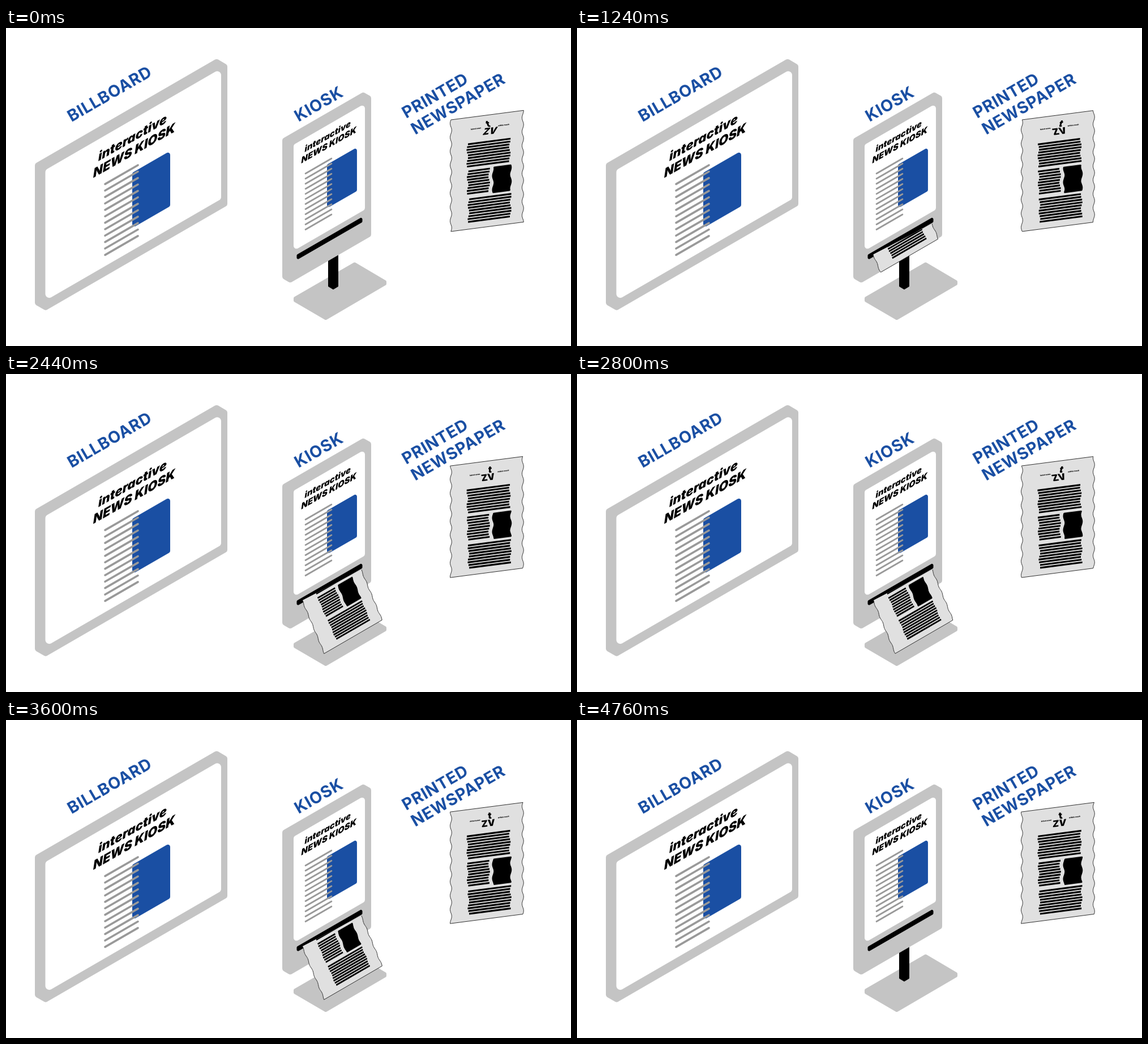
Animation, 998 px wide and 561 px high, one loop 4.8 s. Source, as an HTML page with a canvas:

```html
<!DOCTYPE html>
<html lang="en">
<head>
<meta charset="utf-8">
<title>Billboard, kiosk, printed newspaper</title>
<style>
  html, body { margin: 0; width: 100%; height: 100%; overflow: hidden; background: #fff; }
  canvas { display: block; width: 998px; height: 561px; }
</style>
</head>
<body>
<canvas id="stage" width="998" height="561"></canvas>
<script>
const ctx = document.getElementById('stage').getContext('2d');
const LOOP = 4800, STEP = 40, TAU = Math.PI * 2;
const ISO = Math.tan(Math.PI / 6);
const BLUE = '#1a4fa3', GREY = '#c4c4c4', LINE = '#999', PAPER = '#e0e0e0';
const SANS = 'Inter, Roboto, sans-serif';
const PAGE = { w: 127, h: 197 };
const WAVE = { length: 24.6, period: 192 };

// Closed polygon with rounded corners
function roundPoly(points, radius, fill) {
  const n = points.length, [last, first] = [points[n - 1], points[0]];
  ctx.beginPath();
  ctx.moveTo((last[0] + first[0]) / 2, (last[1] + first[1]) / 2);
  points.forEach((p, i) => {
    const q = points[(i + 1) % n];
    ctx.arcTo(p[0], p[1], q[0], q[1], radius);
  });
  ctx.closePath();
  ctx.fillStyle = fill;
  ctx.fill();
}

// Panel with vertical sides and isometric top and bottom
function isoPanel(x, y, w, h, radius, fill) {
  const rise = w * ISO;
  roundPoly([[x, y], [x + w, y - rise], [x + w, y + h - rise], [x, y + h]], radius, fill);
}

function frame(x, y, w, h, depth) {
  const rise = w * ISO, drop = depth * ISO;
  roundPoly([
    [x, y], [x + w, y - rise], [x + w + depth, y - rise + drop],
    [x + w + depth, y + h - rise + drop], [x + depth, y + h + drop], [x, y + h]
  ], 5, GREY);
}

function label(text, x, y) {
  ctx.save();
  ctx.translate(x, y);
  ctx.rotate(-Math.PI / 6);
  ctx.font = `700 28.5px ${SANS}`;
  ctx.letterSpacing = '0.8px';
  ctx.fillStyle = BLUE;
  ctx.fillText(text, 0, 0);
  ctx.restore();
}

function headline(x, y, scale) {
  ctx.save();
  ctx.transform(scale, -ISO * scale * 0.98, 0, scale, x, y);
  ctx.font = `italic 900 22px ${SANS}`;
  ctx.fillStyle = '#000';
  ctx.fillText('interactive', 9, -24.5);
  ctx.fillText('NEWS KIOSK', 0, 0);
  ctx.restore();
}

// Blue picture with the column of text lines overlapping it
function article(x, y, scale) {
  ctx.save();
  ctx.translate(x, y);
  ctx.scale(scale, scale);
  isoPanel(0, 0, 67, 97.5, 4, BLUE);
  ctx.strokeStyle = LINE;
  ctx.lineWidth = 3.6;
  ctx.lineCap = 'round';
  ctx.beginPath();
  for (let i = 0; i < 12; i++) {
    const top = 20.5 + i * 11.36;
    ctx.moveTo(-48, top - ISO);
    ctx.lineTo(10, top - 59 * ISO);
  }
  ctx.stroke();
  ctx.restore();
}

function billboard() {
  frame(51, 239.5, 321, 248, 19);
  isoPanel(69.5, 250.5, 310.5, 230.5, 7, '#fff');
  headline(154, 264.5, 1);
  article(223, 255.5, 1);
  label('BILLBOARD', 115.8, 166.3);
}

function kiosk() {
  roundPoly([[508, 475], [616, 413], [672, 446], [672, 453], [565, 515.5], [508, 482.5]], 3, GREY);
  roundPoly([[569, 390], [587, 390], [587, 456], [578, 461.5], [569, 456]], 1.5, '#000');
  frame(488, 195.5, 143, 246, 14);
  isoPanel(508, 206, 126, 187, 5, '#fff');
  headline(521.5, 239, 0.673);
  article(567, 241, 0.79);
  isoPanel(513.5, 400, 116, 9.5, 2.5, '#000');
  label('KIOSK', 516.8, 166);
}

// A page in its own coordinates, rippled by a travelling wave
function page(time, amplitude) {
  const angle = (x, y) => TAU * (time / WAVE.period - (y - 0.052 * x) / WAVE.length);
  const bend = (x, y) => [x + amplitude * Math.sin(angle(x, y)), y];
  const slope = (x, y) => -amplitude * TAU / WAVE.length * Math.cos(angle(x, y));

  function sheet(x0, y0, x1, y1) {
    ctx.beginPath();
    for (let y = y0; y <= y1; y += 1.5) ctx.lineTo(...bend(x0, y));
    ctx.lineTo(...bend(x0, y1));
    for (let y = y1; y >= y0; y -= 1.5) ctx.lineTo(...bend(x1, y));
    ctx.lineTo(...bend(x1, y0));
    ctx.closePath();
  }

  function rows(x0, x1, top, gap) {
    ctx.beginPath();
    for (let i = 0; i < 9; i++) {
      const y = top + i * gap;
      ctx.moveTo(...bend(x0, y));
      ctx.lineTo(...bend(x1, y));
    }
    ctx.stroke();
  }

  function word(text, x, y, size, align) {
    ctx.save();
    const [bx, by] = bend(x, y - size * 0.35);
    ctx.transform(1, 0, slope(x, y - size * 0.35), 1, bx, by + size * 0.35);
    ctx.font = `900 ${size}px ${SANS}`;
    ctx.textAlign = align;
    ctx.fillText(text, 0, 0);
    ctx.restore();
  }

  sheet(0, 0, PAGE.w, PAGE.h);
  ctx.fillStyle = PAPER;
  ctx.fill();
  ctx.strokeStyle = '#222';
  ctx.lineWidth = 0.9;
  ctx.stroke();

  ctx.fillStyle = ctx.strokeStyle = '#000';
  word('t', 67.5, 21, 16, 'center');
  word('ZV', 67.5, 34.3, 16, 'center');
  word('latest news', 33.5, 22.3, 3.2, 'left');
  word('within reach', 82, 22.3, 3.2, 'left');

  ctx.lineWidth = 3.1;
  ctx.lineCap = 'butt';
  rows(29, 104, 47, 4.9);
  rows(29.5, 67.5, 95, 4.9);
  rows(31, 105.5, 144.5, 4.95);

  sheet(75.5, 94, 104.5, 137.5);
  ctx.fill();
  ctx.lineWidth = 3;
  ctx.lineJoin = 'round';
  ctx.stroke();
}

function newspaper(time) {
  ctx.save();
  ctx.transform(1, -0.13, 0, 1, 785.9, 162);
  page(time, 1.4);
  ctx.restore();
  label('PRINTED', 706.8, 160);
  label('NEWSPAPER', 722.8, 188.8);
}

function printout(time) {
  if (time < 440 || time >= 4600) return;
  const left = 1 - Math.min(1, (time - 671) / 1671);
  ctx.save();
  ctx.beginPath();
  ctx.moveTo(500, 411.5);
  ctx.lineTo(690, 312.7);
  ctx.lineTo(690, 561);
  ctx.lineTo(500, 561);
  ctx.clip();
  ctx.translate(562.3 - 39.5 * left, 493 - 94 * left);
  ctx.transform(0.803, -0.465, 0.345, 0.825, 0, 0);
  ctx.translate(0, -PAGE.h);
  page(time, 0.8);
  ctx.restore();
}

function draw(now) {
  const time = Math.floor((now % LOOP) / STEP) * STEP;
  ctx.fillStyle = '#fff';
  ctx.fillRect(0, 0, 998, 561);
  billboard();
  kiosk();
  printout(time);
  newspaper(time);
}

const start = performance.now();
function tick() {
  draw(performance.now() - start);
  requestAnimationFrame(tick);
}
tick();
</script>
</body>
</html>
```
